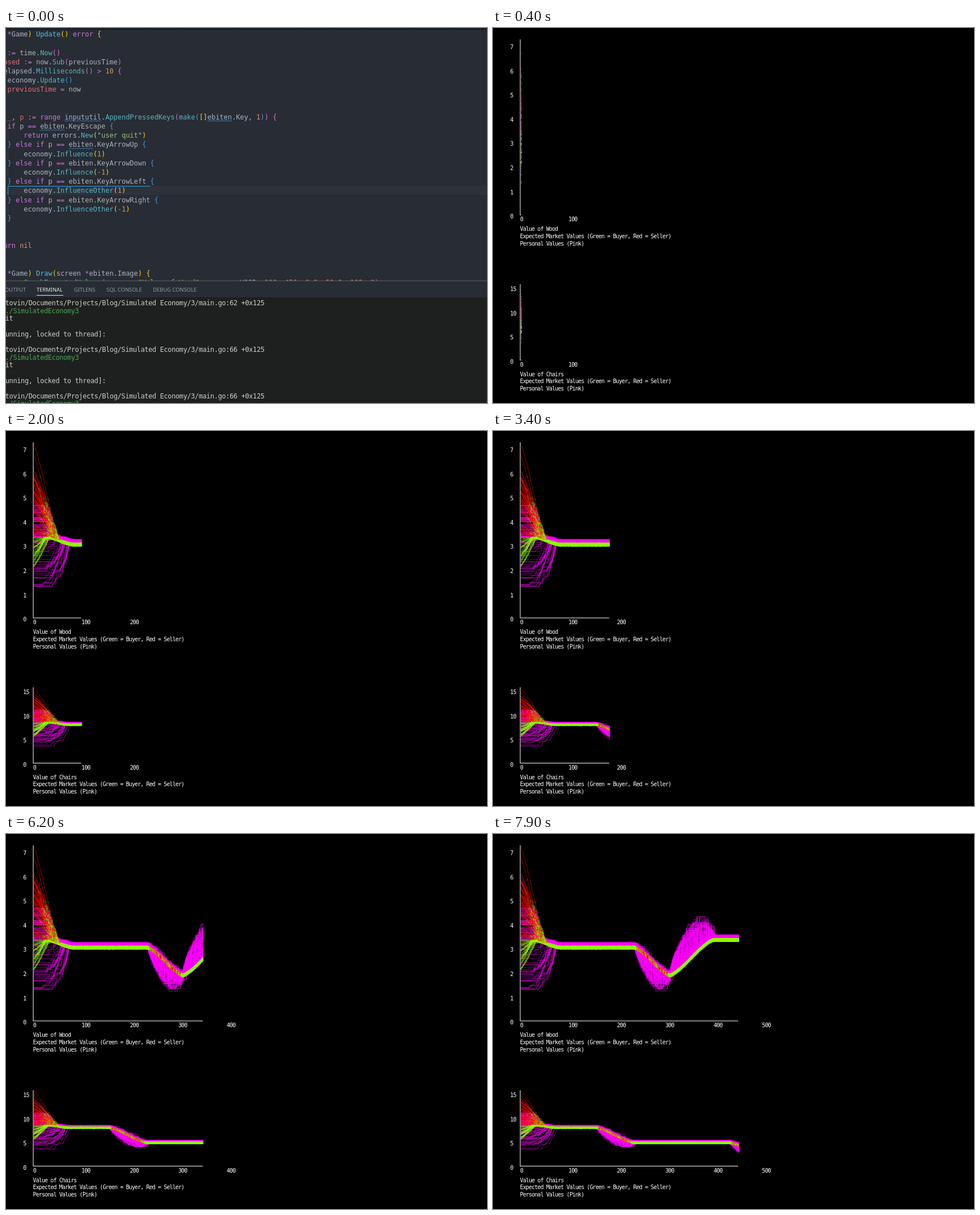
An HTML page with a canvas that plays this animation: 848 by 660 pixels, repeating every 8 s.

```html
<!DOCTYPE html>
<html lang="en">
<head>
<meta charset="utf-8">
<title>Simulated economy</title>
<style>
html, body { margin: 0; height: 100%; overflow: hidden; background: #000; }
canvas { display: block; }
</style>
</head>
<body>
<canvas id="stage" width="848" height="660"></canvas>
<script>
const W = 848, H = 660, LOOP = 8000, FRAME = 100;
const MONO = '"DejaVu Sans Mono", monospace';
const stage = document.getElementById('stage').getContext('2d');

const clamp01 = u => Math.min(1, Math.max(0, u));

function layer(paint) {
  const canvas = document.createElement('canvas');
  canvas.width = W;
  canvas.height = H;
  paint(canvas.getContext('2d'));
  return canvas;
}

function seeded(seed) {
  return () => {
    seed = (seed + 0x6D2B79F5) | 0;
    let n = Math.imul(seed ^ (seed >>> 15), seed | 1);
    n ^= n + Math.imul(n ^ (n >>> 7), n | 61);
    return ((n ^ (n >>> 14)) >>> 0) / 4294967296;
  };
}

// ---------- Code editor ----------
const SOURCE = `func (g *Game) Update() error {

    now := time.Now()
    elapsed := now.Sub(previousTime)
    if elapsed.Milliseconds() > 10 {
        economy.Update()
        previousTime = now
    }

    for _, p := range inpututil.AppendPressedKeys(make([]ebiten.Key, 1)) {
        if p == ebiten.KeyEscape {
            return errors.New("user quit")
        } else if p == ebiten.KeyArrowUp {
            economy.Influence(1)
        } else if p == ebiten.KeyArrowDown {
            economy.Influence(-1)
        } else if p == ebiten.KeyArrowLeft {
            economy.InfluenceOther(1)
        } else if p == ebiten.KeyArrowRight {
            economy.InfluenceOther(-1)
        }
    }

    return nil
}

func (g *Game) Draw(screen *ebiten.Image) {
    economy.GraphExpectedValues(screen, "Value of Wood", economy.WOOD, 100, 450, 0.0, 50.0, 100, 0)`.split('\n');

const RUN = './SimulatedEconomy3';
const crash = line => [`tovin/Documents/Projects/Blog/Simulated Economy/3/main.go:${line} +0x125`, RUN,
  'it', '', 'unning, locked to thread]:', ''];
const TERMINAL = [62, 66, 66].flatMap(crash);

const TOKEN = /"[^"]*"|\d[\d.]*|[A-Za-z_]\w*|[()[\]{}]|:=|==|[^\w\s]/g;
const KEYWORD = /^(func|if|else|return|range|for|error)$/;
const BRACKETS = ['#ffd700', '#da70d6', '#2f9fee'];
let depth = 0;

function tokenColor(token, rest, line) {
  if (token[0] === '"') return '#98c379';
  if (KEYWORD.test(token)) return '#c678dd';
  if (/^(\d.*|nil)$/.test(token)) return '#d19a66';
  if (/[([{]/.test(token)) return BRACKETS[depth++ % 3];
  if (/[)\]}]/.test(token)) return BRACKETS[--depth % 3];
  if (/^\w/.test(token)) {
    if (rest[0] === '(') return line.startsWith('func') ? '#5cb8e4' : '#56b6c2';
    return /^(, \w+)? :?= /.test(rest) ? '#e06c75' : '#abb2bf';
  }
  return /[:=>*-]/.test(token) ? '#c678dd' : '#abb2bf';
}

function squiggle(c, x, y, width) {
  c.beginPath();
  for (let i = 0; i <= width; i++) c.lineTo(x + i, y + Math.sin(i * 1.25));
  c.strokeStyle = '#3a8fd8';
  c.stroke();
}

const editor = layer(c => {
  const advance = 7.193, left = 2.6 - 8 * advance, pitch = 16.18;
  const rect = (color, ...box) => { c.fillStyle = color; c.fillRect(...box); };
  rect('#282c34', 0, 0, W, H);
  rect('#2d323b', 3, 278, W, 16);
  for (const row of [11, 13, 15, 19]) rect('#3d424b', 3, 2.8 + row * pitch, 1, pitch);
  rect('#2f9fee', 3, 278, 251, 1);
  rect('#2f9fee', 3, 278, 1, 16);

  c.font = `11.95px ${MONO}`;
  SOURCE.forEach((line, row) => {
    const y = 15.3 + row * pitch;
    for (const match of line.matchAll(TOKEN)) {
      const token = match[0], x = left + match.index * advance;
      c.fillStyle = tokenColor(token, line.slice(match.index + token.length), line);
      c.fillText(token, x, y);
      const flagged = row < 13 && /^(inpututil|ebiten)$/.test(token);
      if (flagged) squiggle(c, x, y + 2.5, token.length * advance);
    }
  });

  const shade = c.createLinearGradient(0, 0, 0, 5);
  shade.addColorStop(0, '#15181d');
  shade.addColorStop(1, '#15181d00');
  rect(shade, 0, 0, W, 5);

  rect('#282c34', 0, 445, W, 29);
  rect('#62655f', 0, 444.5, W, 1);
  rect('#1e201f', 0, 474, W, H);
  c.font = '9.4px "Noto Sans", sans-serif';
  [['OUTPUT', -2], ['TERMINAL', 54], ['GITLENS', 120], ['SQL CONSOLE', 177], ['DEBUG CONSOLE', 259]]
    .forEach(([label, x]) => {
      c.fillStyle = label === 'TERMINAL' ? '#e7e7e7' : '#96999d';
      c.fillText(label, x, 463.5);
    });
  rect('#e7e7e7', 54, 470, 47, 1);

  c.font = `11.95px ${MONO}`;
  c.letterSpacing = '-0.37px';
  TERMINAL.forEach((line, i) => {
    c.fillStyle = line === RUN ? '#48a556' : '#cccccc';
    c.fillText(line, -1.2, 488 + i * 13.65);
  });
});

// ---------- Charts ----------
const LEFT = 48, RIGHT = 436, HUNDRED = 85.3, STEP = HUNDRED / 100, AGENTS = 100;

// A shift moves the market over a span of x and pulls personal values away from it by up to `pull`.
// Ranges are how far above and below the market the first values lie.
const CHARTS = [{
  title: 'Value of Wood', top: 20, base: 329, maxLabel: 7, labelStep: 1,
  seed: 11, start: 188, noise: 3.3, quantum: 4.27, band: 8,
  expected: { above: 168, below: 52 }, personal: { above: 58, below: 96 },
  shifts: [
    { from: 75, to: 118, move: 12, pull: 0 },
    { from: 250, to: 312, move: 49, pull: 48 },
    { from: 312, to: 388, move: -62.5, pull: -60 }
  ]
}, {
  title: 'Value of Chairs', top: 451, base: 584.5, maxLabel: 15, labelStep: 5,
  seed: 29, start: 513, noise: 2, quantum: 2.1, band: 4,
  expected: { above: 61, below: 28 }, personal: { above: 23, below: 44 },
  shifts: [
    { from: 75, to: 110, move: 4, pull: 0 },
    { from: 183, to: 248, move: 26.5, pull: 20 },
    { from: 418, to: 485, move: 26, pull: 18 }
  ]
}];

const progress = (shift, x) => clamp01((x - shift.from) / (shift.to - shift.from));
const ease = u => (u + u * u * (3 - 2 * u)) / 2;
const market = (chart, x) =>
  chart.shifts.reduce((y, shift) => y + shift.move * ease(progress(shift, x)), chart.start);
const pull = (chart, x) =>
  chart.shifts.reduce((sum, shift) => sum + shift.pull * Math.sin(Math.PI * progress(shift, x)) ** .6, 0);

const side = (range, rank) => rank < 0 ? range.above * rank : range.below * rank;

// Personal values hold still, then jump towards the market in fixed amounts.
function personalLine(c, chart, random, rank) {
  const { quantum } = chart, band = chart.band * random();
  let y = chart.start + side(chart.personal, rank), settled = false, greed = 0;
  c.beginPath();
  for (let x = LEFT + 1; x < RIGHT; x += STEP) {
    const age = (x - LEFT) / 70;
    if (random() < .05) greed = random() ** 2;
    const gap = market(chart, x) - band + greed * pull(chart, x) - y;
    settled ||= Math.abs(gap) < quantum;
    const pace = settled ? .35 : rank < 0 ? (age * 2.3) ** 6 : (age * 1.1) ** 3;
    if (random() < pace) {
      const jumps = Math.round(gap / quantum);
      y += quantum * (settled ? jumps : Math.sign(jumps));
    }
    c.lineTo(x, y);
  }
  c.strokeStyle = '#f0f';
  c.stroke();
}

function sellChance(chart, x, rank) {
  const falling = chart.shifts.some(s => s.pull > 0 && x > s.from + 3 && x < s.to - 3);
  if (falling) return .55;
  return rank < 0 ? 1 - clamp01((x - 58) / 50) : 0;
}

// Expected values close in on the market; sellers are red, buyers green.
function expectedLine(c, chart, random, rank) {
  const paths = { '#f00': new Path2D(), '#8cff00': new Path2D() };
  const span = (rank < 0 ? 40 : 24) * (rank === -1 ? 1 : .8 + random() * .4);
  let last;
  for (let x = LEFT + 1; x < RIGHT; x += STEP) {
    const age = x - LEFT;
    const gap = side(chart.expected, rank) * (1 - clamp01(age / span) ** 1.2);
    const jitter = (random() * 2 - 1) * chart.noise * Math.min(1, .2 + age / 70);
    const y = market(chart, x) + gap + jitter;
    const path = paths[random() < sellChance(chart, x, rank) ? '#f00' : '#8cff00'];
    if (last) {
      path.moveTo(...last);
      path.lineTo(x, y);
    }
    last = [x, y];
  }
  for (const color in paths) {
    c.strokeStyle = color;
    c.stroke(paths[color]);
  }
}

const plots = layer(c => {
  c.lineWidth = .9;
  c.globalAlpha = .6;
  for (const chart of CHARTS) {
    const random = seeded(chart.seed);
    const ranks = Array.from({ length: AGENTS }, () => random() < .62 ? -random() * .76 : random());
    ranks[0] = -1;
    ranks[1] = -.88;
    for (const rank of ranks) personalLine(c, chart, random, Math.sign(rank) * random());
    for (const rank of ranks) expectedLine(c, chart, random, rank);
  }
});

// Plotting runs almost evenly, slowing slightly towards the end.
function plotEdge(time) {
  const u = (time - 400) / 7500;
  return 51 + 382.5 * u + 2.5 * Math.sin(Math.PI * u);
}

function drawCharts(time) {
  const c = stage, edge = plotEdge(time);
  c.fillStyle = '#000';
  c.fillRect(0, 0, W, H);
  c.drawImage(plots, 0, 0, edge, H, 0, 0, edge, H);
  c.fillStyle = '#fff';
  c.font = `10px ${MONO}`;
  c.letterSpacing = '-0.9px';
  for (const { title, top, base, maxLabel, labelStep } of CHARTS) {
    c.fillRect(LEFT - .5, top, 1, base - top);
    c.fillRect(LEFT - .5, base - .5, edge - 1 - LEFT, 1);
    for (let n = 0; n <= maxLabel; n += labelStep) {
      c.fillText(n, 30.3, base + 6.2 - n / labelStep * 42.6);
    }
    for (let k = 0; k < 2 || HUNDRED * (k - 1) < edge - LEFT; k++) {
      c.fillText(k * 100, LEFT - .2 + k * HUNDRED, base + 11);
    }
    [title, 'Expected Market Values (Green = Buyer, Red = Seller)', 'Personal Values (Pink)']
      .forEach((text, i) => c.fillText(text, LEFT - .4, base + 28 + i * 12.8));
  }
}

function drawEditor(opening) {
  stage.drawImage(editor, 0, 0);
  if (!opening) return;
  stage.save();
  stage.shadowColor = 'rgba(0,0,0,.5)';
  stage.shadowBlur = 10;
  stage.fillStyle = 'rgba(0,0,0,.87)';
  stage.fillRect(-40, -40, 494.5, 687);
  stage.restore();
}

function tick(now) {
  const time = Math.floor(now % LOOP / FRAME) * FRAME;
  if (time < 400) drawEditor(time >= 300);
  else drawCharts(time);
  requestAnimationFrame(tick);
}
requestAnimationFrame(tick);
</script>
</body>
</html>
```
